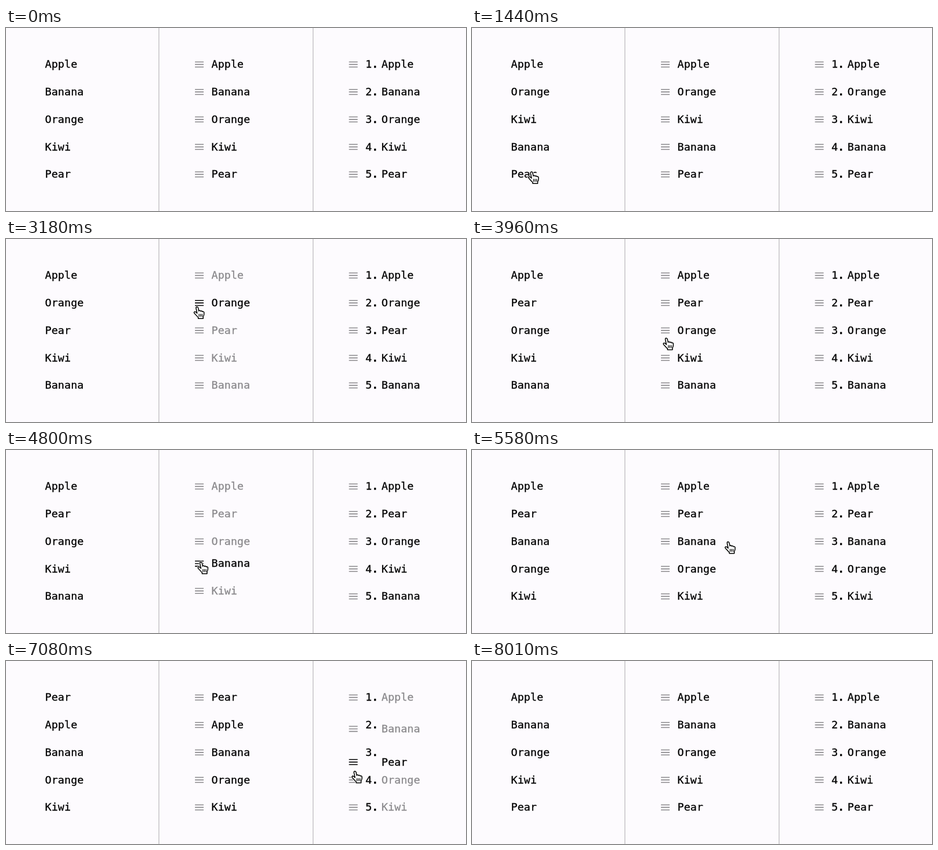
These frames come from a looping animation (796 px wide and 318 px high, 8430 ms). An HTML page:

```html
<!DOCTYPE html>
<html lang="en">
<head>
<meta charset="utf-8">
<title>Sortable lists</title>
<style>
  html, body { margin: 0; width: 100%; height: 100%; overflow: hidden; background: #fdfbfe; }
  svg { display: block; }
  text { font: 18.5px "DejaVu Sans Mono", monospace; fill: currentColor; stroke: currentColor; stroke-width: .3; }
  .dot { font-weight: 700; }
  .divider { stroke: #b4b3b6; stroke-width: 1.1; }
  .handle { stroke-width: 1.6; }
</style>
</head>
<body>
<svg id="stage" width="796" height="318" viewBox="0 0 796 318">
  <path class="divider" d="M264.6 0V318M531.4 0V318"/>
  <g id="lists"></g>
  <g id="cursor" stroke-linejoin="round" stroke-linecap="round">
    <path id="halo" fill="#fff" stroke="#fff" stroke-width="3.2"/>
    <path id="hand" fill="#fff" stroke="#000" stroke-width="1.5"/>
    <path d="M10.2 14.6v4M12.7 14.6v4M15.2 14.6v4" stroke="#000" stroke-width="1.2"/>
  </g>
</svg>
<script>
const LOOP = 8430, TICK = 30, PITCH = 47.75, TOP = 63.4, BASE = 5.9;
const LAG = 20, SHIFT = 150;
const BLACK = '#000', GREY = '#8a898c';
const FRUIT = ['Apple', 'Banana', 'Orange', 'Kiwi', 'Pear'];
const COLS = [{ text: 67.6 }, { text: 355.5, handle: 327 }, { text: 649.8, handle: 593.5, num: 621.9 }];

// Each drag: column, row from/to, vertical travel, times in ms
const DRAGS = [
  { col: 0, from: 1, to: 3, dy: 92.5, on: 300, press: 480, start: 600, end: 990, drop: 1230, off: 1230 },
  { col: 0, from: 4, to: 2, dy: -82, on: 1440, press: 1560, start: 1620, end: 1950, drop: 2100, off: 2100 },
  { col: 1, from: 1, to: 2, dy: 35, on: 3060, press: 3180, start: 3360, end: 3660, drop: 3840, off: 3870 },
  { col: 1, from: 4, to: 2, dy: -90, on: 4260, press: 4380, start: 4650, end: 4980, drop: 5130, off: 5130 },
  { col: 2, from: 1, to: 0, dy: -45, on: 5940, press: 6150, start: 6150, end: 6330, drop: 6690, off: 6690 },
  { col: 2, from: 0, to: 4, dy: 173, on: 6690, press: 6780, start: 6840, end: 7380, drop: 7500, off: 7800 }
];

const clamp = v => Math.max(0, Math.min(1, v));
const easeOut = u => 1 - (1 - clamp(u)) ** 2;
const easeBoth = u => (1 - Math.cos(Math.PI * clamp(u))) / 2;
const mix = (a, b, s) => a.map((v, i) => v + (b[i] - v) * s);

// Cursor legs: start, end, destination, easing, optional Bezier controls
const LEGS = [
  [120, 300, [61, 109], easeOut],
  [600, 990, [70, 201.5], easeOut],
  [1200, 1500, [97, 250], easeOut],
  [1620, 1950, [81, 168], easeOut],
  [2250, 3120, [323.5, 116], easeBoth, [150, 284], [300, 56]],
  [3360, 3660, [326, 151], easeOut],
  [3840, 4290, [326, 256], easeBoth, [334, 190], [332, 230]],
  [4650, 4980, [332, 166], easeOut],
  [5280, 5970, [594, 115], easeBoth, [410, 178], [520, 130]],
  [6150, 6330, [594, 70], easeOut],
  [6840, 7380, [598, 243], easeOut],
  [7770, 7980, [764, 50], easeBoth]
];

const SHOW = 150, HIDE = 8010;

function cursorAt(t) {
  let a = [12, 115];
  for (const [t0, t1, b, ease, c1 = mix(a, b, 1 / 3), c2 = mix(a, b, 2 / 3)] of LEGS) {
    if (t < t0) break;
    const s = ease((t - t0) / (t1 - t0)), r = 1 - s;
    a = a.map((v, i) => r ** 3 * v + 3 * r * r * s * c1[i] + 3 * r * s * s * c2[i] + s ** 3 * b[i]);
  }
  return a;
}

function moved(list, from, to) {
  const next = list.slice();
  next.splice(to, 0, ...next.splice(from, 1));
  return next;
}

// Offset of the row that starts at index `row` while a drag is going on
function offset(d, row, t) {
  const span = d.end - d.start, time = t - d.start - (t < d.end ? LAG : 0);
  if (row === d.from) return d.dy * easeOut(time / span);
  const dir = Math.sign(d.to - d.from), k = (row - d.from) * dir;
  if (k < 1 || k > Math.abs(d.to - d.from)) return 0;
  const share = (k - 0.5) * PITCH / Math.abs(d.dy);
  const cross = d.start + LAG + span * (1 - Math.sqrt(1 - share));
  return -dir * PITCH * easeOut((t - cross) / SHIFT);
}

function add(parent, tag, attrs, label = '') {
  const el = document.createElementNS('http://www.w3.org/2000/svg', tag);
  for (const k in attrs) el.setAttribute(k, attrs[k]);
  el.textContent = label;
  return parent.appendChild(el);
}

const lists = document.getElementById('lists');
const cursor = document.getElementById('cursor');
const HAND = 'M6.9 13L5.2 4.6C4.7 1.2 8.1.8 8.7 3.9L9.8 9.2C10.4 7.6 12.6 7.8 12.8 9.6' +
  'C13.6 8.4 15.5 8.8 15.6 10.4C16.7 9.5 18.4 10.2 18.5 11.9C18.8 15 18.2 17 17 19.2V22.2H8.8V20.2' +
  'C6.5 18.2 4.4 15.2 2.2 12.8C1 11.2 2.8 9.6 4.4 10.7Z';
for (const id of ['halo', 'hand']) document.getElementById(id).setAttribute('d', HAND);

const items = COLS.map(col => {
  const group = add(lists, 'g', {});
  if (col.num) FRUIT.forEach((_, i) => {
    const num = add(group, 'text', { x: col.num, y: TOP + BASE + i * PITCH }, i + 1);
    add(num, 'tspan', { class: 'dot' }, '.');
  });
  return FRUIT.map(name => {
    const el = add(group, 'g', {});
    const bars = col.handle && add(el, 'path', {
      class: 'handle', d: [-4.4, 0, 4.4].map(y => `M${col.handle} ${y}h15`).join('')
    });
    const text = add(el, 'text', { x: col.text, y: BASE }, name);
    return { el, bars, text };
  });
});

function draw(t) {
  let order = FRUIT, drag = null, hover = null;
  for (const d of DRAGS) {
    const name = order[d.from];
    if (t >= d.on && t < d.off) hover = { col: d.col, name };
    if (t >= d.press && t < d.drop) drag = d;
    if (t >= d.drop) order = moved(order, d.from, d.to);
    else break;
  }
  items.forEach((col, c) => order.forEach((name, row) => {
    const { el, bars, text } = col[FRUIT.indexOf(name)];
    const active = drag && drag.col === c;
    const y = TOP + row * PITCH + (active ? offset(drag, row, t) : 0);
    el.setAttribute('transform', `translate(0 ${y.toFixed(2)})`);
    text.setAttribute('color', active && row !== drag.from ? GREY : BLACK);
    if (bars) bars.setAttribute('stroke', hover && hover.col === c && hover.name === name ? BLACK : GREY);
    if (active && row === drag.from && el.nextSibling) el.parentNode.appendChild(el);
  }));
  const [x, y] = cursorAt(t);
  cursor.setAttribute('transform', `translate(${x.toFixed(2)} ${y.toFixed(2)}) scale(1.04 1)`);
  cursor.setAttribute('visibility', t >= SHOW && t < HIDE ? 'visible' : 'hidden');
}

const began = performance.now();
function frame() {
  const t = (performance.now() - began) % LOOP;
  draw(Math.floor(t / TICK) * TICK);
  requestAnimationFrame(frame);
}
frame();
</script>
</body>
</html>
```
